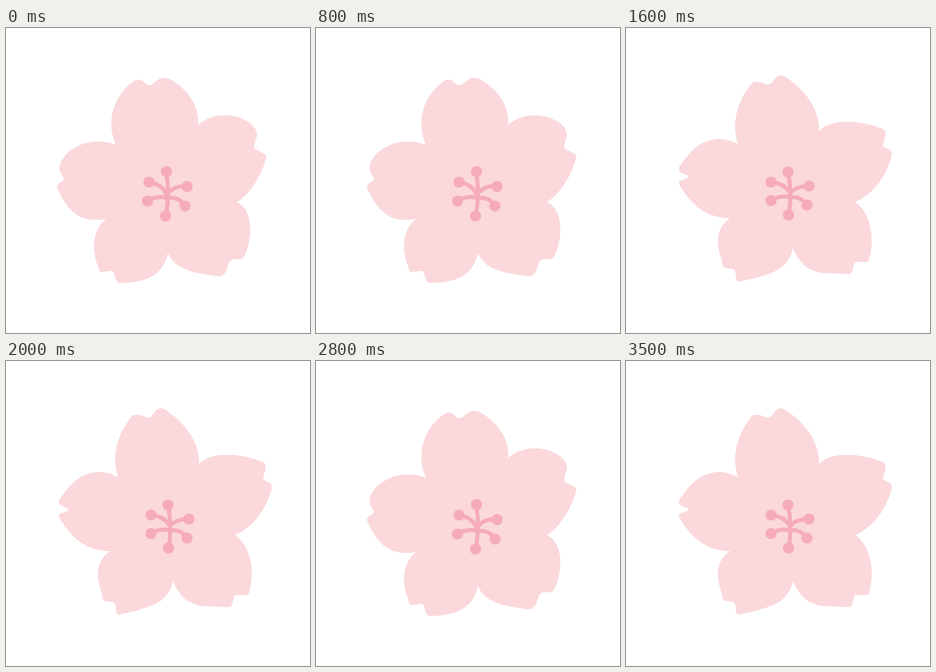
An HTML page for the animation above (3600 ms loop, 304x305 px).

```html
<!DOCTYPE html>
<html lang="en">
<head>
<meta charset="utf-8">
<title>Cherry blossom</title>
<style>
  html, body { margin: 0; width: 100%; height: 100%; overflow: hidden; background: #fff; }
  svg { display: block; width: 100%; height: 100%; }
</style>
</head>
<body>
<svg viewBox="0 0 304 305">
  <path id="petals" fill="#fad8dc"/>
  <path id="filaments" fill="none" stroke="#f5abba" stroke-width="4" stroke-linecap="round"/>
  <path id="anthers" fill="none" stroke="#f5abba" stroke-width="11.2" stroke-linecap="round"/>
</svg>
<script>
const LOOP = 3600;
const SWITCHES = [100, 400, 600, 800, 1100, 1300, 1600, 1800, 2000, 2300, 2500, 2800, 3000, 3200, 3500];

// Petals run clockwise from the top one.
const poses = [
  {
    petals: [
      'M110 117C101 98 104 70 128 53Q134 49 139 55Q144 60 149 54Q158 46 167 53C182 62 194 79 192 97',
      'C207 84 233 84 247 98Q253 104 250 111Q247 119 249 121L259 126Q261 127 260 130C257 144 245 166 231 174',
      'C246 181 248 206 239 227Q236 233 230 231Q224 230 222 237Q220 250 210 248L191 245C174 241 165 234 162 225',
      'C158 243 146 255 114 255Q111 255 109 249Q108 242 105 243L95 244Q93 244 92 238C85 221 87 201 100 191',
      'C75 195 63 185 52 162Q49 157 55 154Q60 152 56 147Q50 139 58 129C68 115 91 109 110 117Z'
    ],
    filaments: 'M160 144Q164 162 160 188M143 154Q156 156 161 167Q167 157 181 158M141 173Q151 167 161 170Q173 168 179 178',
    anthers: [[160.5, 143.5], [143, 154], [181, 158.5], [141.5, 173], [179, 178], [159.5, 188]]
  },
  {
    petals: [
      'M112 116C106 98 109 77 125 56Q128 52 137 55Q144 59 147 53Q152 45 158 48C176 59 194 79 193 103',
      'C205 91 230 91 257 101Q261 103 259 110Q256 118 258 119L264 122Q267 124 265 130C260 149 245 168 229 174',
      'C243 183 250 207 243 232Q242 235 236 234Q228 233 228 236L226 244Q225 246 221 246L196 245C182 243 173 235 167 220',
      'C162 241 148 246 116 253Q110 255 110 250Q110 242 107 241L99 240Q96 239 96 233C88 211 92 199 104 190',
      'C82 190 68 180 54 158Q51 153 56 152L61 150Q65 148 58 146Q50 143 54 138C70 112 90 105 112 116Z'
    ],
    filaments: 'M162 144Q166 162 163 187M145 154Q158 155 164 165Q170 158 183 158M145 172Q154 167 164 169Q175 168 181 177',
    anthers: [[162, 144], [145, 154], [183, 158], [145, 172.5], [181, 177], [162.5, 187]]
  }
];

const setPath = (id, d) => document.getElementById(id).setAttribute('d', d);
let shown = -1;

function draw(time) {
  const t = time % LOOP;
  const index = SWITCHES.filter(at => at <= t).length % 2;
  if (index === shown) return;
  shown = index;
  const pose = poses[index];
  setPath('petals', pose.petals.join(''));
  setPath('filaments', pose.filaments);
  setPath('anthers', pose.anthers.map(([x, y]) => `M${x} ${y}h.01`).join(''));
}

const start = performance.now();
function tick() {
  draw(performance.now() - start);
  requestAnimationFrame(tick);
}
tick();
</script>
</body>
</html>
```
